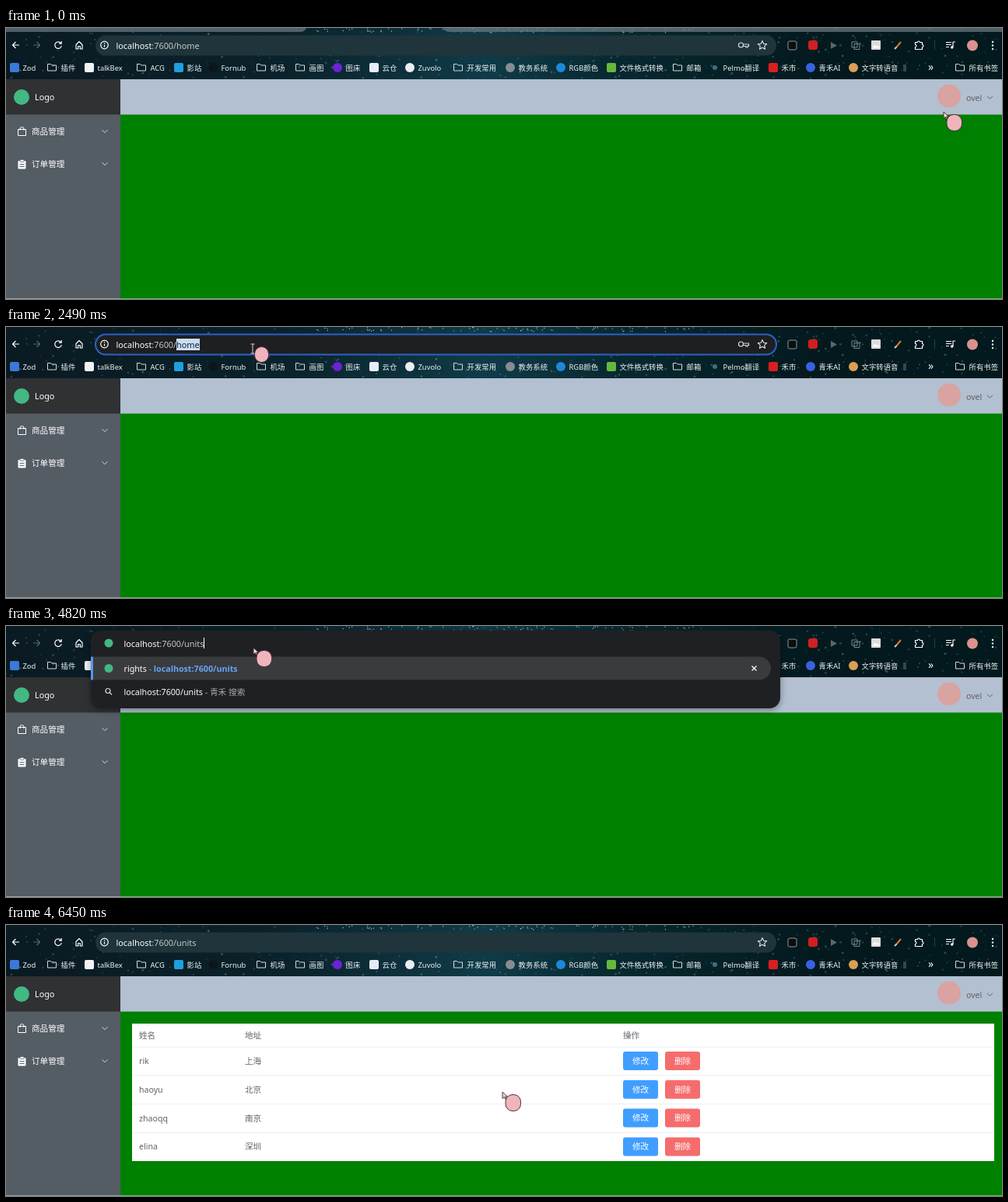
An HTML page that plays this animation: 1280 px wide and 349 px high, repeating every 6520 ms.

```html
<!DOCTYPE html>
<html lang="zh">
<head>
<meta charset="utf-8">
<style>
html, body { margin: 0; width: 100%; height: 100%; overflow: hidden; background: #fff; }
svg { display: block; width: 1280px; height: 349px; }
svg, #url { font-family: "Noto Sans", "Noto Sans CJK SC", sans-serif; }
text { white-space: pre; }
#url { font-size: 10.85px; line-height: 15px; white-space: pre; color: #c3c9cb; }
#url b { font-weight: 400; color: #fff; }
#url mark { background: #c8defb; color: #1f2023; }
#url u { text-underline-offset: 2px; }
#url i { display: inline-block; width: 1px; height: 14px; margin-right: -1px; background: #fff; vertical-align: top; }
</style>
</head>
<body>
<svg id="stage" viewBox="0 0 1280 349"></svg>
<script>
const LOOP = 6520, SITE = 'localhost', PORT = ':7600/', PAGE = 'units', SHORT = 'unit';

// Shape helpers returning SVG markup
const rect = (x, y, w, h, fill, r = 0, more = '') =>
  `<rect x="${x}" y="${y}" width="${w}" height="${h}" rx="${r}" fill="${fill}" ${more}/>`;
const dot = (x, y, r, fill, more = '') => `<circle cx="${x}" cy="${y}" r="${r}" fill="${fill}" ${more}/>`;
const line = (d, stroke = '#fff', w = 1.2, fill = 'none') =>
  `<path d="${d}" fill="${fill}" stroke="${stroke}" stroke-width="${w}" stroke-linejoin="round"/>`;
const text = (x, y, s, size = 10.6, fill = '#fff', more = '') =>
  `<text x="${x}" y="${y}" font-size="${size}" fill="${fill}" ${more}>${s}</text>`;
const group = (id, body, more = '') => `<g id="${id}" ${more}>${body}</g>`;
const chevron = (x, y, c, w = 3.5) => line(`M${x - w} ${y - w / 2}l${w} ${w}l${w} ${-w}`, c, 1);
const folder = x => line(`M${x - 5.5} 55V46.5h4l1.5 1.5h5.5v7z`, '#d5dcde', 1);

let seed = 7;
const rand = () => (seed = (seed * 16807) % 2147483647) / 2147483647;

function sky() {
  const tones = ['#0a1a22', '#0a222b', '#0f3b48', '#07282f', '#03191e', '#02191d'];
  let s = '<defs><linearGradient id="night">' +
    tones.map((c, i) => `<stop offset="${[0, .28, .48, .62, .82, 1][i]}" stop-color="${c}"/>`).join('') +
    '</linearGradient></defs>' + rect(0, 0, 1280, 66, 'url(#night)');
  for (let i = 0; i < 520; i++)
    s += dot((rand() * 1280).toFixed(1), (rand() * 66).toFixed(1), (.4 + rand() * 1.1).toFixed(1),
      '#8fb9c4', `opacity="${(.08 + rand() * .27).toFixed(2)}"`);
  for (let i = 0; i < 70; i++)
    s += dot((390 + rand() * 500).toFixed(1), (rand() * 6).toFixed(1), .7, '#e4f4f6', 'opacity=".7"');
  return s;
}

function bookmarks() {
  const items = [
    [11, 'Zod', '#3b78d8', 1], [59, '插件'], [107, 'talkBex', '#f2f2f2', 1], [174, 'ACG'],
    [222, '影站', '#1f9fe0', 1], [266, 'Fornub', '#0b151a'], [328, '机场'], [378, '画图'],
    [426, '图床', '#6d22d4'], [473, '云仓', '#e6ecf6', 1], [519, 'Zuvolo', '#eceef2'], [581, '开发常用'],
    [648, '教务系统', '#868c90'], [713, 'RGB颜色', '#1e88d8'], [778, '文件格式转换', '#67b83a', 1],
    [863, '邮箱'], [911, 'Pelmo翻译', '#3b7087'], [986, '禾市', '#d8201f', 1], [1034, '青禾AI', '#3a62e0'],
    [1089, '文字转语音', '#d9a054'], [1226, '所有书签']];
  return items.map(([x, label, color, square]) =>
    (!color ? folder(x) : square ? rect(x - 6, 45, 12, 12, color, 2) : dot(x, 51, x === 911 ? 3 : 6, color)) +
    text(x + (color ? 10.5 : 11.5), 54.5, label, 9.4, '#eef2f3')).join('') +
    rect(1153, 47, 4, 9, '#33474d') + text(1185, 55, '»', 14);
}

function toolbar() {
  return line('M17 22H8.5M12.5 18l-4 4 4 4') +
    line('M35 22h8.5M39.5 18l4 4-4 4', '#56666c') +
    group('reload', line('M70.5 19.5A4.3 4.3 0 1 0 71.3 23M71.2 17v3.2H68')) +
    group('stop', line('M63.5 18.5l7 7M70.5 18.5l-7 7')) +
    line('M90 21.5l4-4 4 4V27h-2.7v-3.5h-2.6V27H90z') +
    rect(1005, 17, 11, 11, '#0b0f10', 2, 'stroke="#8d9698"') +
    rect(1031, 16, 12, 12, '#d02020', 3) +
    line('M1060 18l8 4.5-8 4.5z', 'none', 0, '#5c676b') +
    line('M1087 18h7v7h-7zM1090 20.5h7v7h-7z', '#79858a', 1) +
    rect(1112, 16, 12, 12, '#dcdcdc', 1, 'id="picture"') + line('M1113.5 25.5l3-4 2.5 2.5 1.5-1.5 2.5 3z', 'none', 0, '#fff') +
    line('M1142 27l3-3', '#d8c9b0', 2) + line('M1145 24l5-6', '#e5732a', 2) +
    line('M1168.5 18.5h3a1.5 1.5 0 0 1 3 0h3v3a1.5 1.5 0 0 1 0 3v3h-9v-3a1.5 1.5 0 0 0 0-3z') +
    rect(1193, 16, 1, 12, '#20424b') +
    line('M1208 18.5h7M1208 21.5h7M1208 24.5h4M1217 25v-7h3') + dot(1215.7, 25, 1.7, '#fff') +
    dot(1242, 22.5, 7, '#d9928d') + [18, 22.5, 27].map(y => dot(1268, y, 1.2, '#fff')).join('');
}

function shell() {
  const menu = (y, label) => text(33, y + 4, label) + chevron(127, y, '#d6d9db');
  return rect(0, 66, 147, 46, '#303133') + rect(0, 111.5, 147, 237, '#545c64') +
    rect(147, 66, 1133, 46, '#b3c0d1') + rect(147, 111.5, 1133, 237, '#008000') +
    dot(20, 89, 10, '#42b883') + text(37, 93, 'Logo', 10.8) +
    menu(133, '商品管理') + menu(175, '订单管理') +
    line('M15.5 130.5h10v8h-10zM18 132v-2a2.5 2.5 0 0 1 5 0v2', '#fff', 1) +
    rect(15.5, 171, 10, 10.5, '#fff', 1) + rect(18, 169.5, 5, 3, '#fff', 1, 'stroke="#545c64" stroke-width=".7"') +
    line('M17.5 175.5h6M17.5 178.5h6', '#545c64', .9) +
    group('avatar', dot(1212, 87.5, 15, '#d8a3a1')) +
    text(1234, 93.5, 'ovel', 10.6, '#606266') + chevron(1264.5, 89.5, '#606266');
}

function table() {
  const rows = [['rik', '上海'], ['haoyu', '北京'], ['zhaoqq', '南京'], ['elina', '深圳']];
  const head = (x, s) => text(x, 146, s, 10.6, '#909399', 'font-weight="700"');
  const button = (x, y, s, c) => rect(x, y - 12, 45, 24, c, 3) + text(x + 12, y + 3.8, s);
  return rect(162, 127, 1108, 177, '#fff') + head(171, '姓名') + head(307, '地址') + head(793, '操作') +
    rows.map(([name, city], i) => {
      const y = 175 + i * 36.8;
      return rect(162, y - 18.5, 1108, 1, '#ebeef5') + text(171, y + 4, name, 10.6, '#606266') +
        text(307, y + 4, city, 10.6, '#606266') + button(793, y, '修改', '#409eff') + button(847, y, '删除', '#f56c6c');
    }).join('');
}

function omnibox() {
  return rect(115, 9.5, 875, 26, '#1f343b', 13, 'id="bar"') +
    dot(126.5, 22, 4.8, 'none', 'stroke="#fff" stroke-width="1.2"') + line('M126.5 21.5v3M126.5 19v1.3') +
    group('key', dot(944.5, 22, 3, 'none', 'stroke="#d5dcde" stroke-width="1.2"') +
      line('M947.5 21h7v2.5h-1.5v1.5h-2v-1.5h-3.5', '#d5dcde')) +
    line('M972 16.5l1.7 3.7 4 .4-3 2.7.9 4-3.6-2.1-3.6 2.1.9-4-3-2.7 4-.4z', '#e3e8e9', 1.1);
}

function popup() {
  return rect(109, 5.5, 886, 130.5, '#1f2023', 14, 'id="sheet" filter="drop-shadow(0 2px 4px #0006)"') +
    '<path d="M109 39.5H968a15 15 0 0 1 0 30H109z" fill="#3a3b3d"/>' + rect(109, 39.5, 3, 30, '#5a94ee', 1) +
    dot(132, 22, 5.5, '#42b883') + dot(132, 54.5, 5.5, '#42b883') +
    line('M958.5 51.5l6 6M964.5 51.5l-6 6') + '<g id="rows"></g>';
}

const HINT = ['U模式输入。支持笔画（h/', '横，s/竖，p/撇，n/捺，z/', '折）、拆分（水+水+水=&gt;', '淼）、笔画拆分混合输入，',
  '以及符号（uudw：单位，', 'uuxh：序号，uuts：特殊，', 'uubd：标点，uusx：数', '学，uujh：几何，uuzm：', '字母）输入。'];

function ime() {
  return rect(229.5, 29, 138, 143, '#f9f9f9', 6, 'id="panel"') + rect(232, 32, 47, 20, '#efefef', 3) +
    rect(232.5, 36.5, 2.5, 11, '#2468c0', 1) + '<g id="candidate"></g>' +
    rect(283, 32, 1, 20, '#e2e2e2') + rect(345, 32, 1, 20, '#e2e2e2') +
    line('M296 39v7l-5-3.5zM310 39v7l5-3.5z', 'none', 0, '#9b9b9b') + chevron(356.5, 42.5, '#333', 4.5) +
    group('hint', rect(230, 55.5, 137, 1, '#e4e4e4') +
      HINT.map((s, i) => text(241, 71.5 + i * 11.5, s, 9.5, '#666')).join(''));
}

const pointer = group('pointer',
  group('arrow', line('M0 0V8.5L2.2 6.5 3.6 9.3 5 8.6 3.7 6H6.5z', '#3a2a30', .9, '#f3d5da') +
    rect(4, 3.5, 19.5, 21, '#f0b4bd', 9, 'stroke="#4b3039"')) +
  group('beam', line('M-2.5-6h5M0-6V6M-2.5 6h5', '#e9c9cf', 1) +
    rect(2.5, -2.5, 18, 20, '#f0b4bd', 9, 'stroke="#4b3039"')));

document.getElementById('stage').innerHTML =
  rect(0, 0, 1280, 349, '#fff') + sky() +
  group('idle', '<path d="M0 0H386q-2 5-8 5H0zM562 0H1280V5H570q-6 0-8-5z" fill="#66797f" opacity=".75"/>') +
  rect(0, 348, 1280, 1, '#e3e5e6') + group('shell', shell()) + group('table', table()) +
  toolbar() + bookmarks() + omnibox() + group('popup', popup()) +
  '<foreignObject id="field" x="141" y="14.5" width="300" height="16"><div id="url"></div></foreignObject>' +
  group('ime', ime()) + pointer;

const $ = Object.fromEntries([...document.querySelectorAll('[id]')].map(e => [e.id, e]));
const show = (id, on) => { $[id].style.display = on ? '' : 'none'; };
const attr = (id, values) => { for (const k in values) $[id].setAttribute(k, values[k]); };
const put = (id, html) => { if ($[id].last !== html) $[id].innerHTML = $[id].last = html; };

// Pointer way points: time, x, y
const PATH = [[0, 1205, 108], [70, 1207, 106], [330, 1254, 80], [670, 1240, 98], [740, 1160, 95], [1020, 504, 79], [1080, 440, 72],
  [1350, 262, 48], [1420, 266, 55], [1700, 290, 24], [2020, 217, 22], [2080, 217, 22], [2450, 317, 28], [3100, 317, 28],
  [4620, 318, 28], [5210, 318, 28], [5460, 368, 64], [5640, 368, 64], [5900, 210, 180], [6100, 480, 260],
  [6310, 174, 313], [6380, 813, 262], [6440, 638, 215], [LOOP, 638, 215]];

function place(t) {
  const i = PATH.findIndex(p => p[0] > t), [t0, x0, y0] = PATH[i - 1], [t1, x1, y1] = PATH[i];
  const k = (t - t0) / (t1 - t0);
  return [x0 + (x1 - x0) * k, y0 + (y1 - y0) * k];
}

const typed = t => PAGE.slice(0, 1 + [3570, 3830, 4160, 4420].filter(at => t >= at).length);

function address(t, x) {
  const base = `<b>${SITE}</b>${PORT}`;
  if (t < 1700) return base + 'home';
  if (t < 2080) return `<mark>${SITE + PORT}home</mark>`;
  if (t < 3100) {
    const n = [222, 229, 237, 246].filter(edge => x > edge).length;
    return `${base}<mark>${'home'.slice(0, n)}</mark>${'home'.slice(n)}`;
  }
  if (t >= 5210) return base + PAGE;
  const s = typed(t);
  return base + (t < 4620 ? `<u>${s}</u>` : s) + `<i></i><b>${SHORT.slice(s.length)}</b>`;
}

function suggestions(s) {
  const grey = x => `<tspan fill="#a5a9ac">${x}</tspan>`;
  const visit = (y, page) => text(151.5, y,
    `rights${grey(' - ')}<tspan fill="#66a3f5" font-weight="600">${SITE + PORT + page}</tspan>`, 10.7);
  const many = s.length < 4, y = many ? 118.5 : 88.5;
  return visit(58.5, many ? SHORT : PAGE) + (many ? visit(88.5, PAGE) + dot(132, 84.5, 5.5, '#42b883') : '') +
    dot(131, y - 5, 3, 'none', 'stroke="#d5d8da" stroke-width="1.2"') + line(`M133 ${y - 3}l3 3`, '#d5d8da') +
    text(151.5, y, `${SITE + PORT + s}${grey(' - 青禾 搜索')}`, 10.7);
}

function render(t) {
  const [x, y] = place(t), s = typed(t);
  const open = t >= 3100 && t < 5210, focus = t >= 1700 && t < 5210;
  const blank = t >= 5350 && t < 5550, loading = t >= 5210 && t < 5690, beam = t > 1650 && t < 3100;

  show('idle', t < 1700);
  show('shell', !blank);
  show('avatar', t < 5350 || t >= 5690);
  show('table', t >= 5550);
  show('stop', loading);
  show('reload', !loading);
  show('key', t < 5210);
  attr('picture', { fill: t >= 5280 && t < 5760 ? '#2f86f0' : '#dcdcdc' });
  attr('bar', focus ? { fill: '#1e1f22', stroke: '#2c63c6', 'stroke-width': 2 } : { fill: '#1f343b', stroke: 'none' });

  show('popup', open);
  attr('popup', { opacity: t < 3630 ? .93 : 1 });
  attr('sheet', { height: s.length < 4 ? 130.5 : 100.5 });
  put('rows', suggestions(s));
  attr('field', { x: open ? 151.5 : 141.5 });
  put('url', address(t, x));

  show('ime', t >= 3100 && t < 4620);
  show('hint', t < 3570);
  attr('panel', { height: t < 3570 ? 143 : 27 });
  put('candidate', text(241, 46.5, `1 ${s}`, 10.5, '#333'));

  attr('pointer', { transform: `translate(${x.toFixed(1)} ${y.toFixed(1)})` });
  show('arrow', !beam);
  show('beam', beam);
}

function tick() {
  render(performance.now() % LOOP);
  requestAnimationFrame(tick);
}
tick();
</script>
</body>
</html>
```
